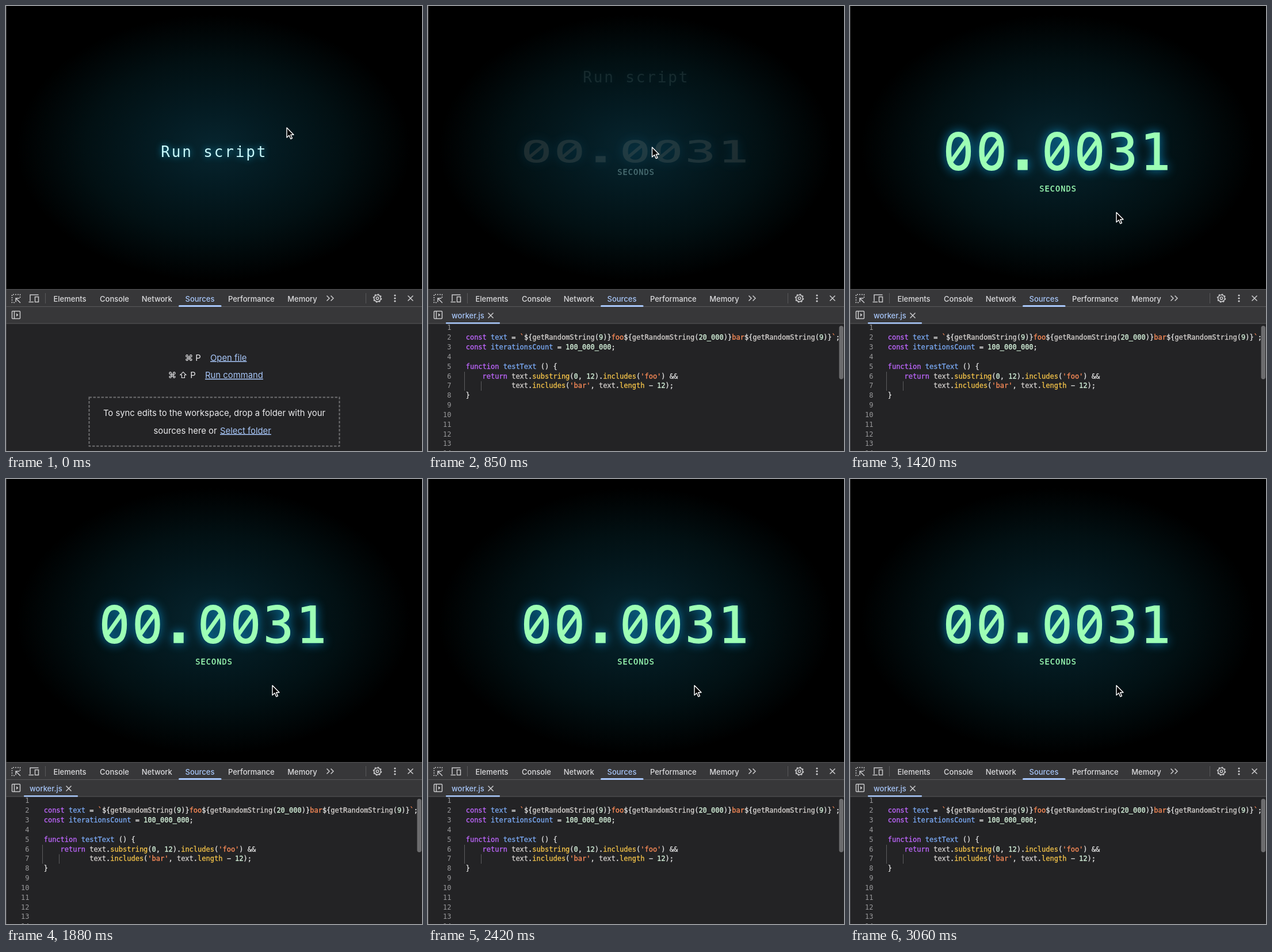
These frames come from a looping animation (723x775 px, 3090 ms). An HTML page:

```html
<!DOCTYPE html>
<html lang="en">
<head>
<meta charset="utf-8">
<title>Run script</title>
<style>
  html, body { margin: 0; width: 100%; height: 100%; overflow: hidden; background: #000; }
  svg { display: block; width: 723px; height: 775px; }
  text { white-space: pre; }
  .mono, .code { font-family: "DejaVu Sans Mono", monospace; }
  .ui { font: 500 13px Inter, sans-serif; fill: #dcdcde; }
  .hint { font: 400 14.85px Inter, sans-serif; fill: #ececee; }
  .mid { text-anchor: middle; }
  .ui.on, .link { fill: #a8c7fa; }
  .link { text-decoration: underline; }
  .code { font-size: 12px; color: #e6e6e6; }
  .code, .code tspan { fill: currentColor; stroke: currentColor; stroke-width: .3px; }
  .num { text-anchor: end; color: #98989a; stroke: none; }
  .k { color: #bf67ff; }
  .v { color: #7cacf8; }
  .s { color: #fe8d59; }
  .p { color: #f7c64a; }
  .n { color: #d6f3dc; }
  .r { color: #d6d2cf; }
  .icon { fill: none; stroke: #c9c9cb; stroke-width: 1.5; }
  .rule { fill: #58585a; }
  #script { font-size: 26px; letter-spacing: 2.85px; fill: #c9f9fb; filter: drop-shadow(0 0 6px #0b8fb4); }
  #glow { filter: drop-shadow(0 0 9px #0a86bd); }
  #digits { font-size: 88px; letter-spacing: 4px; }
  #seconds { font-size: 13.5px; letter-spacing: 1.1px; stroke-width: .3px; }
</style>
</head>
<body>
<svg viewBox="0 0 723 775">
  <defs>
    <radialGradient id="halo" gradientUnits="userSpaceOnUse" cx="0" cy="0" r="1" gradientTransform="translate(361 247) scale(342 232)">
      <stop offset="0" stop-color="#07252f"/>
      <stop offset=".3" stop-color="#041b22"/>
      <stop offset=".65" stop-color="#021013"/>
      <stop offset="1" stop-color="#000"/>
    </radialGradient>
    <g id="zero" fill="none">
      <path stroke-width="9.2" d="M0-29.5C12-29.5 17-18 17 0S12 29.5 0 29.5-17 18-17 0-12-29.5 0-29.5Z"/>
      <path stroke-width="7" d="M-12 17 12-17"/>
    </g>
    <path id="cross" class="icon" d="M-4.5-4.5 4.5 4.5M4.5-4.5-4.5 4.5"/>
  </defs>

  <rect width="723" height="775"/>
  <rect width="723" height="493" fill="url(#halo)"/>

  <text id="script" class="mono" x="269.3" y="263">Run script</text>
  <g id="timer">
    <g id="glow">
      <g id="digits" class="mono" stroke-width="1.4">
        <use href="#zero" x="188.5" y="253"/>
        <use href="#zero" x="246" y="253"/>
        <rect x="292" y="268" width="16" height="17"/>
        <use href="#zero" x="360" y="253"/>
        <use href="#zero" x="416.5" y="253"/>
        <text x="447" y="285">31</text>
      </g>
    </g>
    <text id="seconds" class="mono" x="329.3">SECONDS</text>
  </g>

  <rect y="493" width="723" height="60" fill="#373739"/>
  <rect y="553" width="723" height="222" fill="#232325"/>
  <g class="rule">
    <rect y="493" width="723" height="1"/>
    <rect y="523" width="723" height="1"/>
    <rect y="552.5" width="723" height="1"/>
    <rect x="68" y="500" width="1" height="18"/>
    <rect x="625" y="500" width="1" height="18"/>
    <rect width="1" height="775" opacity=".7"/>
  </g>

  <g class="icon">
    <path d="M24.5 508V502.500H10.500V516.500H16" stroke-dasharray="2 2"/>
    <path d="M25 517 17.500 509.500M17 515.500V509H23.500"/>
    <path d="M48 515.500H39.500M42 514V503H56.500M50.500 506.500H56.500V515.500H50.500Z"/>
    <path d="M557.500 504.500 562 509 557.500 513.500M564.500 504.500 569 509 564.500 513.500"/>
    <circle cx="645.5" cy="509" r="5.8"/>
    <circle cx="645.5" cy="509" r="7" stroke-dasharray="2.75 2.75"/>
    <circle cx="645.5" cy="509" r="2.2"/>
    <rect x="10.500" y="531.500" width="14" height="13" rx="1"/>
    <path d="M14.500 532V544"/>
    <path d="M18 535V541L21.500 538Z" fill="#c9c9cb" stroke="none"/>
  </g>
  <g fill="#d0d0d2">
    <circle cx="676" cy="504" r="1.6"/>
    <circle cx="676" cy="509" r="1.6"/>
    <circle cx="676" cy="514" r="1.6"/>
  </g>
  <use href="#cross" x="703" y="509"/>
  <g id="tabs"></g>
  <rect x="300" y="521" width="74.500" height="3" rx="1.500" fill="#a8c7fa"/>

  <g id="welcome" class="hint">
    <text class="mid" x="318" y="617.500">⌘</text>
    <text class="mid" x="334" y="617.500">P</text>
    <text class="link" x="355" y="617.500">Open file</text>
    <text class="mid" x="289" y="648">⌘</text>
    <text class="mid" x="308" y="648">⇧</text>
    <text class="mid" x="325" y="648">P</text>
    <text class="link" x="346" y="648">Run command</text>
    <rect x="144.500" y="681.500" width="435" height="85" fill="none" stroke="#6f6f71" stroke-width="2" stroke-dasharray="4.500 2.500"/>
    <text class="mid" x="362" y="714">To sync edits to the workspace, drop a folder with your</text>
    <text x="256.500" y="744.500">sources here or</text>
    <text class="link" x="372" y="744.500">Select folder</text>
  </g>

  <g id="editor">
    <text class="ui on" x="41" y="543.500">worker.js</text>
    <use href="#cross" x="109" y="539"/>
    <rect x="31" y="551" width="94" height="2.500" rx="1" fill="#a8c7fa"/>
    <path d="M63.500 637V670M92.500 653.500V670" stroke="#5c5c5e"/>
    <g id="code"></g>
    <rect x="714.500" y="557" width="7.500" height="93" rx="3.700" fill="#6c6c6e"/>
  </g>

  <path id="cursor" d="M0 0V17L4 13.300 6.800 19.500 9.400 18.400 6.700 12.300H12Z" stroke="#fff" stroke-width="1.400" stroke-linejoin="round"/>
</svg>
<script>
const LOOP = 3090;
const OPEN_AT = 680;
const $ = id => document.getElementById(id);
const clamp = v => Math.min(1, Math.max(0, v));
const span = (t, from, to) => clamp((t - from) / (to - from));
const mix = (a, b, p) => a + (b - a) * p;
const easeOut = p => 1 - (1 - p) ** 3;
const easeInOut = p => p < 0.5 ? 4 * p ** 3 : 1 - 4 * (1 - p) ** 3;
const tint = (a, b, p) => `rgb(${a.map((v, i) => Math.round(mix(v, b[i], p)))})`;
const GREY = [165, 170, 176], SLATE = [150, 190, 200], GREEN = [157, 255, 181];

const tabs = [['Elements', 111], ['Console', 188.5], ['Network', 262.3], ['Sources', 337], ['Performance', 426.3], ['Memory', 515]];
$('tabs').innerHTML = tabs.map(([name, x]) =>
  `<text class="ui mid ${name === 'Sources' ? 'on' : ''}" x="${x}" y="514.5">${name}</text>`).join('');

// Each source line alternates token class and token text.
const random = n => ['', '${', 'r', 'getRandomString', '', '(', 'n', n, '', ')}'];
const source = {
  2: ['k', 'const ', 'v', 'text', '', ' = ', 's', '`', ...random('9'), 's', 'foo', ...random('20_000'),
      's', 'bar', ...random('9'), 's', '`', '', ';'],
  3: ['k', 'const ', 'v', 'iterationsCount', '', ' = ', 'n', '100_000_000', '', ';'],
  5: ['k', 'function ', 'v', 'testText', '', ' () {'],
  6: ['', '    ', 'k', 'return ', 'r', 'text', '', '.', 'p', 'substring', '', '(', 'n', '0', '', ', ', 'n', '12', '', ').',
      'p', 'includes', '', '(', 's', "'foo'", '', ') &amp;&amp;'],
  7: ['', ' '.repeat(11), 'r', 'text', '', '.', 'p', 'includes', '', '(', 's', "'bar'", '', ', ', 'r', 'text', '', '.',
      'p', 'length', '', ' − ', 'n', '12', '', ');'],
  8: ['', '}']
};
let listing = '';
for (let line = 1; line <= 14; line++) {
  const y = 564.4 + (line - 1) * 16.83;
  listing += `<text class="code num" x="40.5" y="${y}">${line}</text>`;
  const tokens = source[line] || [];
  let body = '';
  for (let i = 0; i < tokens.length; i += 2) body += `<tspan class="${tokens[i]}">${tokens[i + 1]}</tspan>`;
  listing += `<text class="code" x="65.7" y="${y}">${body}</text>`;
}
$('code').innerHTML = listing;

const show = (id, visible) => $(id).setAttribute('display', visible ? 'inline' : 'none');

function draw(t) {
  show('welcome', t < OPEN_AT);
  show('editor', t >= OPEN_AT);

  const leave = span(t, 680, 870);
  show('script', leave < 1);
  $('script').setAttribute('transform', `translate(0 ${-130 * easeOut(leave)})`);
  $('script').setAttribute('opacity', 1 - leave);

  const enter = span(t, 780, 1000);
  show('timer', enter > 0);
  const scale = 0.2 + 0.8 * Math.sin(enter * Math.PI / 2);
  const ink = tint(GREY, GREEN, enter ** 2);
  $('digits').setAttribute('transform', `translate(0 253) scale(1 ${scale}) translate(0 -253)`);
  $('digits').setAttribute('fill', ink);
  $('digits').setAttribute('stroke', ink);
  $('glow').setAttribute('opacity', enter ** 1.6);
  const label = tint(SLATE, GREEN, enter ** 2);
  $('seconds').setAttribute('y', 323 - 71 * (1 - scale));
  $('seconds').setAttribute('fill', label);
  $('seconds').setAttribute('stroke', label);
  $('seconds').setAttribute('opacity', clamp(enter * 1.5));

  const approach = easeInOut(span(t, 30, 540));
  const depart = easeInOut(span(t, 930, 1360));
  const x = mix(mix(488, 389.5, approach), 463, depart);
  const y = mix(mix(212, 246, approach), 359.5, depart);
  $('cursor').setAttribute('transform', `translate(${x} ${y})`);
}

const start = performance.now();
function tick() {
  draw((performance.now() - start) % LOOP);
  requestAnimationFrame(tick);
}
draw(0);
requestAnimationFrame(tick);
</script>
</body>
</html>
```
